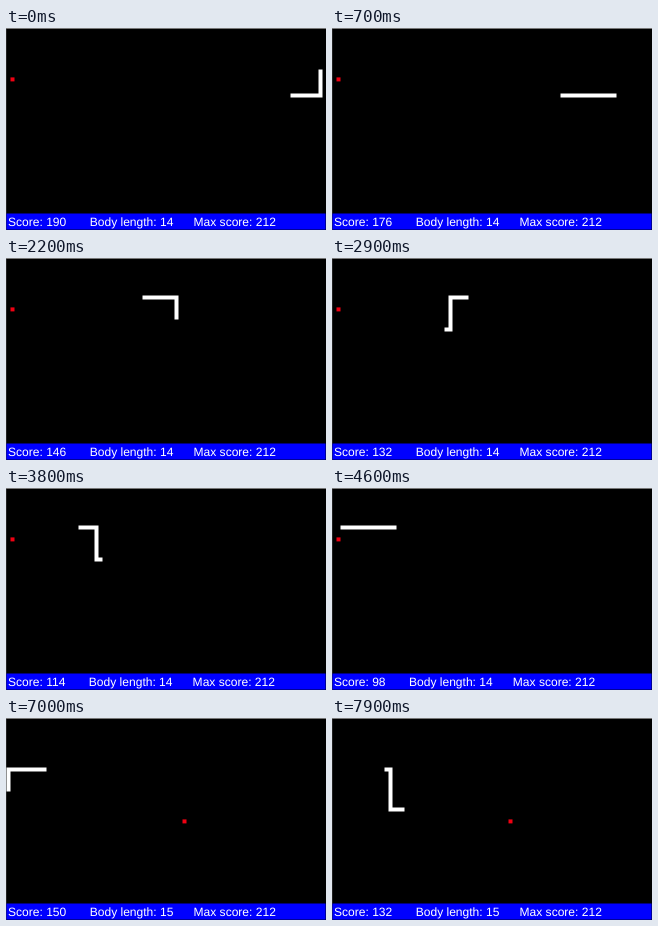
Animation of 320 by 202 pixels, one loop 8 s. Source, as an HTML page:

```html
<!DOCTYPE html>
<html lang="en">
<head>
<meta charset="utf-8">
<title>Snake</title>
<style>
  html, body { margin: 0; width: 100%; height: 100%; overflow: hidden; background: #000; }
  svg { display: block; width: 100vw; height: 100vh; }
  text {
    font: 12.05px "Liberation Sans", Arial, sans-serif;
    fill: #fff;
    white-space: pre;
    text-rendering: geometricPrecision;
  }
</style>
</head>
<body>
<svg viewBox="0 0 320 202">
  <rect width="320" height="202" fill="#000"/>
  <rect width="1" height="202" fill="#222"/>
  <rect width="320" height="1" fill="#777"/>
  <rect x="0.4" y="185.5" width="319.2" height="16.1" fill="#00f"/>
  <g transform="translate(0.5 1.4)">
    <rect id="food" width="4" height="4" fill="#f00012"/>
    <polyline id="snake" fill="none" stroke="#fff" stroke-width="4" stroke-linecap="square" stroke-linejoin="miter"/>
  </g>
  <text id="status" x="2" y="198"></text>
</svg>
<script>
const LOOP = 8000, TICK = 100, STEPS_PER_TICK = 2;
const CELL = 4;
const EAT_STEP = 132, START_LENGTH = 14, START_SCORE = 190, FOOD_BONUS = 100, MAX_SCORE = 212;

// Corners of the route, as [column, row].
const corners = [
  [78, 10], [78, 16], [42, 16], [42, 9], [29, 9], [29, 17], [22, 17], [22, 9],
  [2, 9], [2, 29], [0, 29], [0, 12], [14, 12], [14, 22], [17, 22]
];

const [snake, food, status] = ["snake", "food", "status"].map(id => document.getElementById(id));

function walk(points) {
  const cells = [points[0]];
  for (const [toX, toY] of points.slice(1)) {
    let [x, y] = cells[cells.length - 1];
    while (x !== toX || y !== toY) {
      x += Math.sign(toX - x);
      y += Math.sign(toY - y);
      cells.push([x, y]);
    }
  }
  return cells;
}

const route = walk(corners);
const center = cell => cell.map(n => (n + 0.5) * CELL);

function draw(time) {
  const step = Math.floor((time % LOOP) / TICK) * STEPS_PER_TICK;
  const eaten = step >= EAT_STEP;
  const length = START_LENGTH + (eaten ? 1 : 0);
  const score = START_SCORE - step + (eaten ? FOOD_BONUS : 0);

  const end = step + START_LENGTH;
  snake.setAttribute("points", route.slice(end - length, end).map(center).join(" "));

  const [foodX, foodY] = eaten ? [44, 25] : [1, 12];
  food.setAttribute("x", foodX * CELL);
  food.setAttribute("y", foodY * CELL);

  status.textContent = [
    `Score: ${score}`, " ".repeat(7),
    `Body length: ${length}`, " ".repeat(6),
    `Max score: ${MAX_SCORE}`
  ].join("");
}

let start;
function frame(now) {
  start ??= now;
  draw(now - start);
  requestAnimationFrame(frame);
}
draw(0);
requestAnimationFrame(frame);
</script>
</body>
</html>
```
